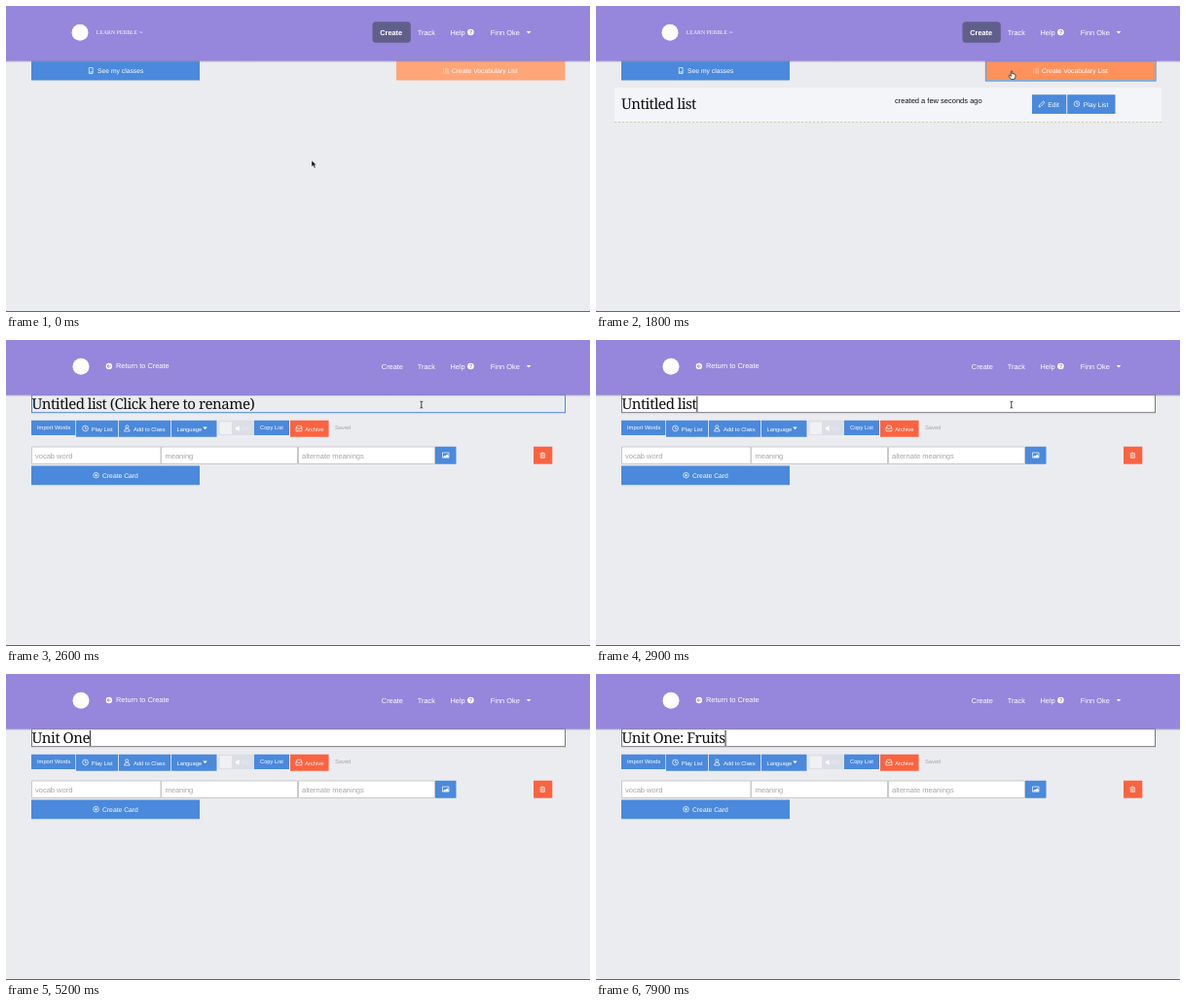
These frames come from a looping animation (600 px wide and 315 px high, 8000 ms). An HTML page:

```html
<!DOCTYPE html>
<html lang="en">
<head>
<meta charset="utf-8">
<title>Vocabulary list</title>
<style>
  html, body { margin: 0; width: 100%; height: 100%; overflow: hidden; background: #ebecf0; }
  svg { display: block; width: 100vw; height: 100vh; }
  text { font: 7.5px "Liberation Sans", Arial, sans-serif; fill: #fff; text-rendering: geometricPrecision; white-space: pre; }
  .nav { font-size: 7.4px; }
  .mid { font-size: 6.75px; }
  .small { font-size: 5.75px; }
  .bold { font-weight: bold; }
  .brand { font: 5.8px "Liberation Serif", serif; }
  .title { font: 15px "Noto Serif", serif; letter-spacing: -.48px; fill: #111; }
  .dark { fill: #111; }
  .hint { fill: #a5a5a5; }
  .blue { fill: #4a89dc; }
  .red { fill: #fb6340; }
  .field { fill: #fff; stroke: #c9c9c9; }
  .icon { fill: none; stroke: #fff; stroke-width: .7; }
  .pointer { fill: #fff; stroke: #111; stroke-width: .7; stroke-linejoin: round; }
</style>
</head>
<body>
<svg viewBox="0 0 600 315">
  <defs>
    <linearGradient id="shade" x2="0" y2="1">
      <stop stop-color="#8f86b8" stop-opacity=".65"/>
      <stop offset="1" stop-color="#8f86b8" stop-opacity="0"/>
    </linearGradient>
  </defs>
  <rect width="600" height="315" fill="#ebecf0"/>

  <g id="listPage">
    <rect class="blue" x="26" y="56" width="173" height="20.5"/>
    <path class="icon" d="M85.3 63.5h3.8v6h-3.8zM85.3 68h3.8"/>
    <text class="mid" x="94" y="69.4">See my classes</text>
    <rect id="createList" x="401" y="56" width="173.5" height="20.5"/>
    <path class="icon" opacity=".65" d="M449 65h1m1 0h4m-6 2h1m1 0h4m-6 2h1m1 0h4"/>
    <text class="mid" x="458" y="69.4">Create Vocabulary List</text>
    <rect id="focusRing" x="400.5" y="56.5" width="174.5" height="20.5" fill="none" stroke="#5ba4e6" stroke-width="1.4"/>
    <g id="newRow">
      <rect x="19" y="84" width="562" height="35" fill="#f4f5f9"/>
      <path d="M19 119.5H581" stroke="#ccd0a8" stroke-dasharray="2 2"/>
      <text class="title" x="26" y="106">Untitled list</text>
      <text class="dark" x="307" y="99.7">created a few seconds ago</text>
      <path class="blue" d="M448 91.3h35.3v19.7h-35.3zM484.2 91.3h49.3v19.7h-49.3z"/>
      <path class="icon" d="M455 104l.6-2 4-4 1.4 1.4-4 4z"/>
      <text class="mid" x="464.3" y="103.6">Edit</text>
      <circle class="icon" cx="494" cy="100.7" r="2.8"/>
      <path class="icon" d="M494 99v2h1.5"/>
      <text class="mid" x="500.8" y="103.6">Play List</text>
    </g>
  </g>

  <g id="editPage">
    <rect id="titleBox" x="26.5" y="56.5" width="548" height="18.2"/>
    <rect id="selection" x="27" y="58" height="16" fill="#b3d4fd"/>
    <text id="titleText" class="title" x="26.6" y="70.7"></text>
    <path id="caret" d="M0 58v16" stroke="#111" stroke-width=".9"/>

    <path class="blue" d="M26 82.7h45.3v15.3H26zM72 82.7h43v17H72zM115.8 82.7h53.4v17h-53.4zM170 82.7h46.5v17H170zM255 82.7h36v15.3h-36z"/>
    <path class="red" d="M292 82.7h39.6v17H292z"/>
    <text class="small" x="32" y="92.4">Import Words</text>
    <circle class="icon" cx="81.5" cy="91" r="2.9"/>
    <path class="icon" d="M81.5 89.3v2h1.5"/>
    <text class="small" x="87.8" y="93.5">Play List</text>
    <circle class="icon" cx="124.3" cy="89.3" r="1.5"/>
    <path class="icon" d="M121.5 94q.3-3 2.8-3t2.8 3z"/>
    <text class="small" x="131" y="93.5">Add to Class</text>
    <text class="small" x="175.5" y="93.5">Language</text>
    <path d="M202.3 89.5h4.4l-2.2 2.8z" fill="#fff"/>
    <rect x="218" y="82.7" width="37" height="15.3" fill="#dcdee7"/>
    <rect x="219.5" y="84.3" width="12.5" height="12.7" fill="#f1f1f3"/>
    <path d="M236 89.8h1.3l2.2-1.7v5.8l-2.2-1.7H236z" fill="#fff"/>
    <text class="small" x="242" y="93.3" opacity=".5">On</text>
    <text class="small" x="261" y="92.4">Copy List</text>
    <path class="icon" d="M298 90.5l1-2.3h4l1 2.3v3.3h-6zh1.7l.5 1h1.6l.5-1h1.7"/>
    <text class="small" x="307.2" y="93.5">Archive</text>
    <text class="small hint" x="338" y="92.4">Saved</text>

    <path class="field" d="M26.5 110h132.5v17.5h-132.5zM159.5 110h140v17.5h-140zM300.5 110h140v17.5h-140z"/>
    <text class="hint" x="30" y="121.5">vocab word</text>
    <text class="hint" x="163.5" y="121.5">meaning</text>
    <text class="hint" x="304" y="121.5">alternate meanings</text>
    <path class="blue" d="M441 109.7h21.5v18H441zM26 129.6h173v19.6H26z"/>
    <path class="icon" d="M448.5 116h6.5v5.2h-6.5z"/>
    <path d="M449 120.8l1.6-2 1 .8 1.6-2 1.5 1.7v1.5z" fill="#fff"/>
    <path class="red" d="M542 109.7h19.3v18H542z"/>
    <path class="icon" d="M548.6 117h5.4m-3.6 0v-1h1.8v1m-2.9.2v4.2h4v-4.2m-2.6 1v2.4m1.2 0v-2.4"/>
    <circle class="icon" cx="92.5" cy="139.2" r="2.8"/>
    <path class="icon" d="M91 139.2h3m-1.5-1.5v3"/>
    <text class="mid" x="99" y="141.8">Create Card</text>
  </g>

  <rect width="600" height="56.5" fill="#9686dc"/>
  <rect y="56" width="600" height="2.6" fill="url(#shade)"/>
  <circle id="logo" cy="27.3" r="8.5" fill="#fff"/>
  <g id="listHeader">
    <text class="brand" x="92.8" y="29.3">LEARN PEBBLE <tspan font-size="4">™</tspan></text>
    <rect x="376.5" y="16.3" width="39.3" height="21.4" rx="3.5" fill="#605f8c"/>
    <text class="nav bold" x="384.2" y="29.8">Create</text>
  </g>
  <g id="editHeader">
    <circle cx="105.8" cy="27" r="3.2" fill="#fff"/>
    <path d="M107.8 27h-3.6m1.7-1.8l-1.8 1.8 1.8 1.8" fill="none" stroke="#9686dc" stroke-width=".9"/>
    <text class="nav" x="113" y="29.4">Return to Create</text>
    <text class="nav" x="385.8" y="29.8">Create</text>
  </g>
  <text class="nav" x="422.8" y="29.8">Track</text>
  <text class="nav" x="456.5" y="29.5">Help</text>
  <circle cx="477.4" cy="27" r="3.3" fill="#fff"/>
  <text class="bold" x="477.4" y="29.1" text-anchor="middle" style="font-size:5.8px;fill:#9686dc">?</text>
  <text class="nav" x="497.8" y="29.8">Finn Oke</text>
  <path d="M534.7 26h4.6l-2.3 2.5z" fill="#fff"/>
  <rect y="314" width="600" height="1" fill="#66676b"/>

  <path id="arrow" d="M0 0v6.6l1.6-1.5 1.3 2.8 1.2-.6-1.3-2.6h2.1z" fill="#111" stroke="#fff" stroke-width=".4"/>
  <path id="hand" class="pointer" d="M-.7.6q.7-1.2 1.4 0v2.6q2.8-.2 3.4 1.2 0 2.6-1 4.4h-3.9q-1-1.6-2.3-3.4.4-1.2 1.6-.2l.8.7z"/>
  <path id="beam" d="M425.4 63.2q1.4 0 1.4.7 0-.7 1.4-.7m-1.4.7v5.4m-1.4.7q1.4 0 1.4-.7 0 .7 1.4.7" fill="none" stroke="#111" stroke-width=".8"/>
</svg>
<script>
  const LOOP = 8000, STEP = 100;
  const CLICK = 1500, OPEN = 2100, EDIT = 2800, SELECT = 3100;
  const TYPED = "Unit One: Fruits";
  const KEY_TIMES = [3500, 3700, 3900, 4100, 4300, 4700, 4900, 5200,
                     5700, 5900, 6300, 6700, 7000, 7300, 7500, 7700];

  const el = id => document.getElementById(id);
  const show = (id, on) => el(id).style.display = on ? "" : "none";
  const set = (id, attrs) => Object.entries(attrs).forEach(([k, v]) => el(id).setAttribute(k, v));
  const progress = (t, from, to) => Math.min(1, Math.max(0, (t - from) / (to - from)));
  const smooth = p => p * p * (3 - 2 * p);
  const mix = (a, b, p) => a + (b - a) * p;

  function drawPointer(t) {
    const travel = smooth(progress(t, 0, 800)), settle = progress(t, 800, 1100);
    const x = mix(314, 424.5, travel) + 2.5 * settle;
    const y = mix(159, 67.5, travel) - settle;
    const hover = y < 76.5;
    const place = { transform: `translate(${x} ${y})` };
    set("arrow", place);
    set("hand", place);
    show("arrow", t < OPEN && !hover);
    show("hand", t < OPEN && hover);
    show("beam", t >= OPEN && t < SELECT);
    const heat = progress(t, 600, 1100);
    set("createList", { fill: `rgb(255 ${mix(165, 146, heat)} ${mix(120, 92, heat)})` });
  }

  function drawTitle(t) {
    const keys = KEY_TIMES.filter(k => k <= t).length;
    const editing = t >= EDIT;
    const text = el("titleText");
    text.textContent = keys ? TYPED.slice(0, keys)
      : "Untitled list" + (editing ? "" : " (Click here to rename)");
    const width = text.getComputedTextLength();
    set("titleBox", { fill: editing ? "#fff" : "#ebecf0", stroke: editing ? "#77787c" : "#4a89dc" });
    set("caret", { transform: `translate(${27 + width} 0)` });
    set("selection", { width });
    const selected = t >= SELECT && !keys;
    show("selection", selected);
    show("caret", editing && !selected);
  }

  function draw(now) {
    const t = Math.floor(now % LOOP / STEP) * STEP;
    const open = t >= OPEN;
    for (const id of ["listPage", "listHeader"]) show(id, !open);
    for (const id of ["editPage", "editHeader"]) show(id, open);
    show("focusRing", t >= CLICK);
    show("newRow", t >= CLICK + STEP);
    set("logo", { cx: open ? 77 : 76 });
    drawPointer(t);
    if (open) drawTitle(t);
  }

  const start = performance.now();
  function tick() {
    draw(performance.now() - start);
    requestAnimationFrame(tick);
  }
  tick();
</script>
</body>
</html>
```
